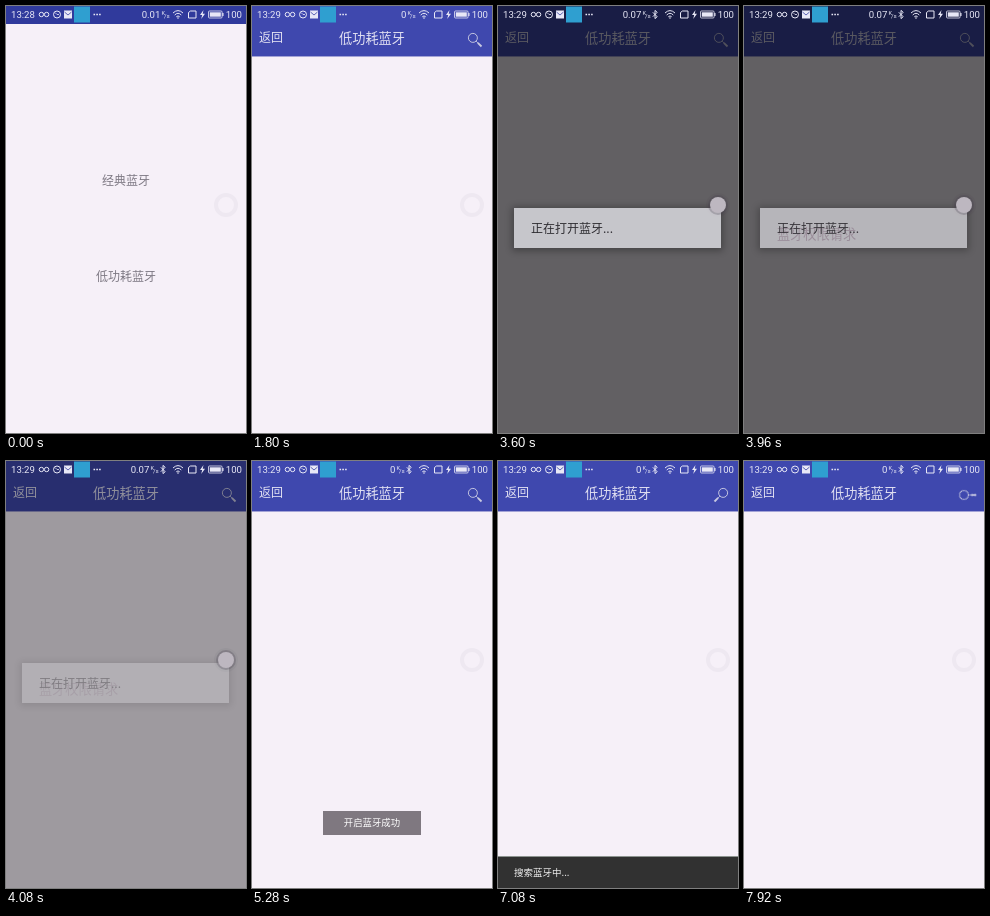
An HTML page that plays this animation: 240x427 px, repeating every 8 s.

```html
<!DOCTYPE html>
<html lang="zh-CN">
<head>
<meta charset="utf-8">
<title>低功耗蓝牙</title>
<style>
html, body { margin: 0; width: 100%; height: 100%; overflow: hidden; background: #f6f0f8; }
#stage {
  position: relative; width: 240px; height: 427px; overflow: hidden; background: #f6f0f8;
  font-family: "Noto Sans CJK SC", "Noto Sans CJK", sans-serif;
}
#stage div, #status { position: absolute; }
.layer { inset: 0; }
/* centred single-line label: x and y are its middle */
.label {
  left: var(--x); top: var(--y); transform: translate(-50%, -50%);
  line-height: 1; white-space: nowrap;
}
.left { transform: translate(0, -50%); }

/* one 8 s timeline in 120 ms steps: 1.5% is one step */
.timed { animation: 8s step-end -2ms infinite; }

.home { color: #7d7883; font-size: 12px; }
.home-bar { left: 0; top: 0; width: 240px; height: 18px; background: #303a9c; }

.ble { background: #f6f0f8; animation-name: enter; }
.bar {
  left: 0; top: 0; width: 240px; height: 50px; background: #3f48ae; color: #e2e1f2;
  box-shadow: 0 1px #a3a3d6;
}
.back { font-size: 12px; }
.title { font-size: 13.2px; }
.search { left: 210.5px; top: 21.5px; width: 24px; height: 24px; animation-name: spin; }
.search svg { display: block; }

.dim { background: #000; animation-name: dim; }

.dialog { background: #fafafa; }
.ask {
  left: 12px; top: 178px; width: 216px; height: 88px; overflow: hidden; color: #3a3340;
  box-shadow: 0 3px 6px 2px rgba(65, 45, 75, .38); animation-name: ask;
}
.ask .msg { font-size: 12px; }
.ask .btn { font-size: 10.6px; }
.ask .ok { color: #4a9dd6; }
.line { background: #e4e2e6; }
.wait {
  left: 16px; top: 202px; width: 207px; height: 40px; background: #faf9ff; color: #141218;
  box-shadow: 0 1px 7px 2px rgba(0, 0, 0, .45); animation-name: wait;
}
.wait .msg { font-size: 12px; }
.wait .ghost { font-size: 13.2px; color: #c8b4c6; animation-name: ghost; }

.toast {
  left: 71px; top: 350px; width: 98px; height: 24px; background: #7f7880;
  color: #fff; font-size: 9.4px; animation-name: toast;
}
.snack {
  left: 0; top: 395px; width: 240px; height: 31px; background: #313131; color: #f0f0f0;
  border-top: 1px solid #8d9490; font-size: 9.5px; animation-name: snack;
}

.ring {
  left: 208px; top: 187px; width: 16px; height: 16px; border: 4px solid #eee8f1;
  border-radius: 50%;
}
.ask .ring { left: 196px; top: 9px; border-color: #ede5fa; }
.dot {
  left: 212px; top: 191px; width: 16px; height: 16px; border-radius: 50%;
  background: #bdb7c0; box-shadow: 0 0 0 2px rgba(70, 60, 75, .25); animation-name: dot;
}

#status { left: 0; top: 0; font-family: Roboto, sans-serif; font-size: 9.6px; }
.min28 { animation-name: min28; }
.min29 { animation-name: min29; }
.net { animation-name: net; }
.rate1 { animation-name: rate1; }
.rate0 { animation-name: rate0; }
.rate7 { animation-name: rate7; }
.bt { animation-name: bt; }

@keyframes enter {
  0% { transform: translateX(100%); }
  13.5% { transform: translateX(66%); }
  15% { transform: translateX(32%); }
  16.5% { transform: translateX(13%); }
  18% { transform: translateX(4%); }
  19.5%, 100% { transform: none; }
}
@keyframes dim {
  0% { opacity: 0; }
  25.5% { opacity: 0; animation-timing-function: steps(5); }
  33% { opacity: .51; animation-timing-function: steps(2); }
  36% { opacity: .6; }
  51% { opacity: .36; }
  52.5% { opacity: .14; }
  54%, 100% { opacity: 0; }
}
@keyframes ask {
  0% { opacity: 0; transform: scale(.92); }
  27% { opacity: 0; transform: scale(.92); animation-timing-function: steps(3); }
  31.5% { opacity: 1; transform: none; }
  40.5% { opacity: 1; transform: none; animation-timing-function: steps(3); }
  45%, 100% { opacity: 0; transform: none; }
}
@keyframes wait {
  0% { opacity: 0; }
  42% { opacity: 0; animation-timing-function: steps(3); }
  46.5% { opacity: 1; }
  49.5% { opacity: .56; }
  51% { opacity: .22; }
  52.5%, 100% { opacity: 0; }
}
@keyframes ghost {
  0% { opacity: 0; }
  49.5% { opacity: 1; }
  52.5%, 100% { opacity: 0; }
}
@keyframes toast {
  0% { opacity: 0; }
  51% { opacity: 0; animation-timing-function: steps(2); }
  54% { opacity: 1; }
  76.5% { opacity: 1; animation-timing-function: steps(4); }
  82.5%, 100% { opacity: 0; }
}
@keyframes snack {
  0% { transform: translateY(36px); }
  67.5% { transform: translateY(20px); }
  69% { transform: translateY(5px); }
  70.5% { transform: none; }
  90% { transform: translateY(6px); }
  91.5% { transform: translateY(25px); }
  93%, 100% { transform: translateY(36px); }
}
@keyframes spin {
  0% { transform: rotate(0); }
  67.5% { transform: rotate(0); animation-timing-function: steps(21); }
  99%, 100% { transform: rotate(675deg); }
}
@keyframes dot { 0% { opacity: 0; } 45% { opacity: 1; } 52.5%, 100% { opacity: 0; } }
@keyframes min28 { 0% { opacity: 1; } 15%, 100% { opacity: 0; } }
@keyframes min29 { 0% { opacity: 0; } 15%, 100% { opacity: 1; } }
@keyframes net { 0% { transform: none; } 45%, 100% { transform: translateX(-11px); } }
@keyframes bt { 0% { opacity: 0; } 45%, 100% { opacity: 1; } }
@keyframes rate1 { 0% { opacity: 1; } 9%, 100% { opacity: 0; } }
@keyframes rate0 { 0% { opacity: 0; } 9% { opacity: 1; } 45% { opacity: 0; } 54%, 100% { opacity: 1; } }
@keyframes rate7 { 0% { opacity: 0; } 45% { opacity: 1; } 54%, 100% { opacity: 0; } }
</style>
</head>
<body>
<div id="stage">
  <div class="layer home">
    <div class="home-bar"></div>
    <div class="label" style="--x:120px;--y:174px">经典蓝牙</div>
    <div class="label" style="--x:120px;--y:270px">低功耗蓝牙</div>
  </div>

  <div class="layer ble timed">
    <div class="bar">
      <div class="label left back" style="--x:7px;--y:31px">返回</div>
      <div class="label title" style="--x:120px;--y:31.6px">低功耗蓝牙</div>
      <div class="search timed">
        <svg width="24" height="24" viewBox="-12 -12 24 24" fill="none" stroke="#c9cae2">
          <g transform="rotate(45)">
            <circle cx="-3" r="4.5" stroke-width=".9"/>
            <path d="M1.7 0H4" stroke-width=".9"/>
            <path d="M4 0H9.2" stroke-width="1.8"/>
          </g>
        </svg>
      </div>
    </div>
  </div>

  <div class="ring"></div>
  <div class="toast timed"><div class="label" style="--x:49px;--y:12px">开启蓝牙成功</div></div>
  <div class="snack timed"><div class="label left" style="--x:16px;--y:15.5px">搜索蓝牙中...</div></div>

  <div class="layer dim timed"></div>

  <div class="dialog ask timed">
    <div class="ring"></div>
    <div class="label msg" style="--x:108px;--y:29px">此应用需要使用蓝牙功能</div>
    <div class="line" style="left:0;top:55px;width:216px;height:1px"></div>
    <div class="line" style="left:107px;top:55px;width:1px;height:33px"></div>
    <div class="label btn" style="--x:53.5px;--y:72px">拒绝</div>
    <div class="label btn ok" style="--x:162px;--y:72px">允许</div>
  </div>

  <div class="dialog wait timed">
    <div class="label left ghost timed" style="--x:17px;--y:26px">蓝牙权限请求</div>
    <div class="label left msg" style="--x:17px;--y:20px">正在打开蓝牙...</div>
  </div>

  <div class="dot timed"></div>

  <svg id="status" width="240" height="18" fill="#e8e8f6">
    <text class="min28 timed" x="5" y="12">13:28</text>
    <text class="min29 timed" x="5" y="12">13:29</text>
    <g fill="none" stroke="#e8e8f6">
      <circle cx="35.4" cy="8.5" r="2.2"/>
      <circle cx="40.6" cy="8.5" r="2.2"/>
      <circle cx="51" cy="8.5" r="3.5"/>
      <path d="M51 8.5L49 6.5M51 8.5H53" stroke-width=".8"/>
    </g>
    <rect x="58" y="4.5" width="8" height="8"/>
    <path d="M58.5 6L62 9L65.5 6" fill="none" stroke="#3a44a4" stroke-width=".8"/>
    <rect x="68" y="0.5" width="16" height="16" fill="#2f9fd0"/>
    <path d="M87.5 8.5h1.6m1.2 0h1.6m1.2 0h1.6" stroke="#e8e8f6" stroke-width="1.5"/>

    <g class="net timed">
      <g text-anchor="end">
        <text class="rate1 timed" x="154.4" y="12">0.01</text>
        <text class="rate0 timed" x="154.4" y="12">0</text>
        <text class="rate7 timed" x="154.4" y="12">0.07</text>
      </g>
      <text x="155.6" y="9.2" font-size="5.6">K</text>
      <text x="158" y="11.8" font-size="6.2">/s</text>
    </g>
    <path class="bt timed" d="M154.8 6.3L159.2 10.7L157 12.6V4.4L159.2 6.3L154.8 10.7" fill="none" stroke="#e8e8f6"/>
    <g fill="none" stroke="#e8e8f6">
      <path d="M167 7Q172 2.2 177 7M168.7 9Q172 5.6 175.3 9M170.3 10.8Q172 9 173.7 10.8"/>
      <path d="M182.5 6.5L184.5 5H190V12H182.5Z"/>
      <rect x="202.5" y="5" width="13.6" height="7" rx="1" stroke-width=".8"/>
    </g>
    <circle cx="172" cy="12" r=".8"/>
    <path d="M197.5 4L194 9H196.2L195.2 13L199 7.8H196.7Z"/>
    <rect x="203.8" y="6.3" width="11" height="4.4"/>
    <rect x="216.3" y="7" width="1.2" height="3"/>
    <text x="219.8" y="12">100</text>
  </svg>
</div>
</body>
</html>
```
